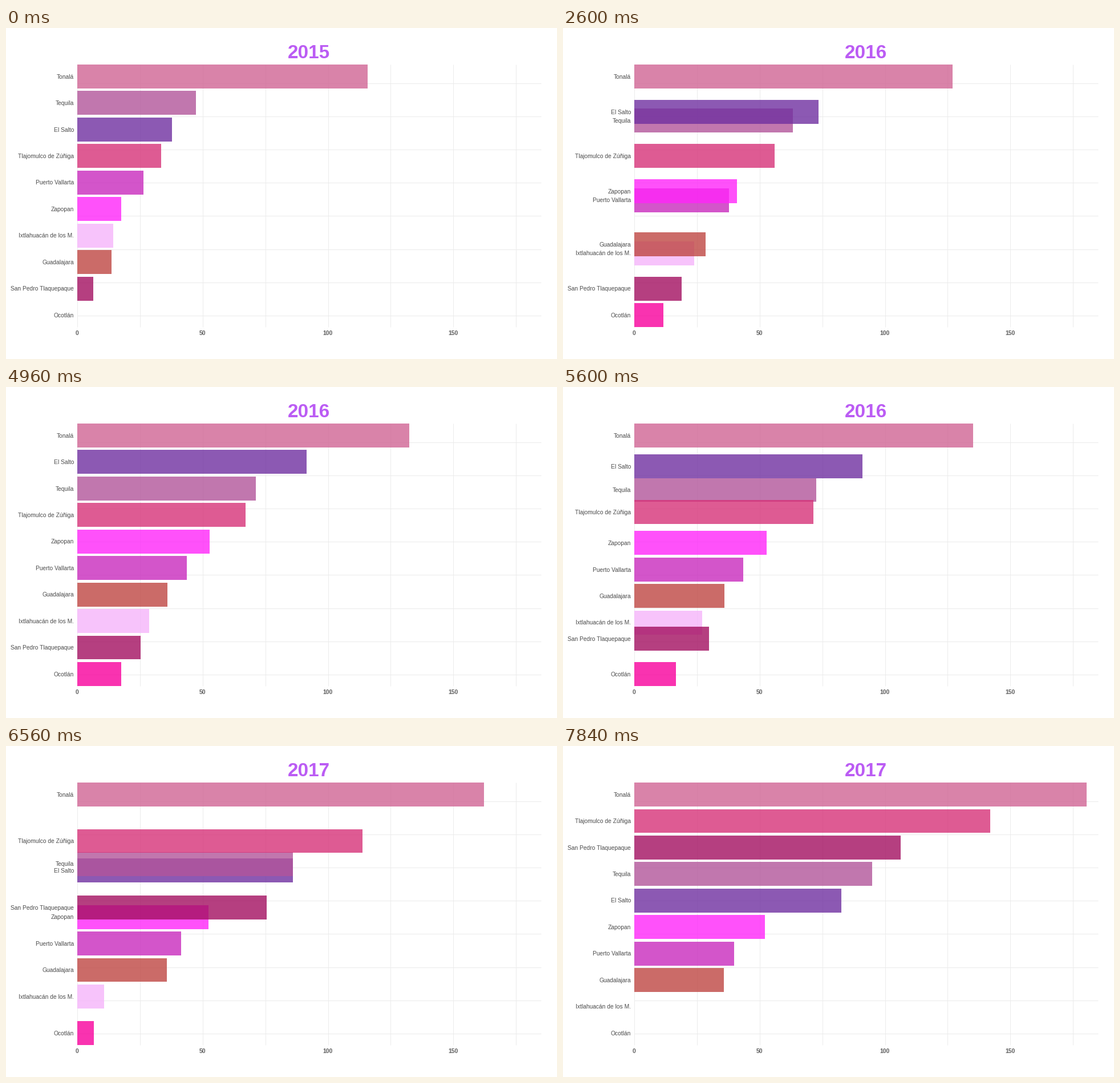
Animation of 966 by 580 pixels, one loop 8 s. Source, as a matplotlib script:

```python
import matplotlib.pyplot as plt
from matplotlib.animation import FuncAnimation
from matplotlib.patches import Rectangle

WIDTH, HEIGHT, DPI = 966, 580, 100
PX = 72 / DPI
FRAMES, INTERVAL = 200, 40

LEFT, RIGHT, TOP, BOTTOM = 124.7, 938, 64, 524
UNIT = 4.398
PITCH = (BOTTOM - TOP) / 9.9
BAR = 0.9 * PITCH

YEARS = (2015, 2016, 2017)
# (first frame, length) of the move from one year to the next
MOVES = ((20, 80), (121, 79))

# name, colour, value in each year
TOWNS = [
    ("Tonalá", "#D06494", (115.8, 132.4, 180.3)),
    ("Tequila", "#B2559A", (47.45, 71.25, 94.9)),
    ("El Salto", "#7030A0", (37.8, 91.5, 82.6)),
    ("Tlajomulco de Zúñiga", "#D63278", (33.6, 67.2, 142.1)),
    ("Puerto Vallarta", "#C82ABD", (26.35, 43.7, 39.95)),
    ("Zapopan", "#FF25F9", (17.6, 52.8, 52.2)),
    ("Ixtlahuacán de los M.", "#F5B5FB", (14.5, 28.65, 0)),
    ("Guadalajara", "#BE4642", (13.6, 36.0, 35.8)),
    ("San Pedro Tlaquepaque", "#A30F60", (6.37, 25.35, 106.3)),
    ("Ocotlán", "#F8009C", (0, 17.6, 0)),
]


def ranks(year):
    order = sorted(range(len(TOWNS)), key=lambda i: -TOWNS[i][2][year])
    return [order.index(i) for i in range(len(TOWNS))]


RANKS = [ranks(year) for year in range(len(YEARS))]


def ease(p):
    return 4 * p**3 if p < 0.5 else 1 - 4 * (1 - p) ** 3


def mix(a, b, t):
    return a + (b - a) * t


fig = plt.figure(figsize=(WIDTH / DPI, HEIGHT / DPI), dpi=DPI, facecolor="white")
ax = fig.add_axes([0, 0, 1, 1])
ax.set_xlim(0, WIDTH)
ax.set_ylim(HEIGHT, 0)
ax.axis("off")


def write(x, y, text, size, color, align="center", weight="normal"):
    return ax.text(x, y, text, size=size * PX, color=color, ha=align,
                   va="baseline", weight=weight, family="Liberation Sans")


grid = dict(color="#EBEBEB", linewidth=PX, zorder=0)
ax.vlines([LEFT + 25 * k * UNIT for k in range(8)], TOP, BOTTOM, **grid)
ax.hlines([97 + 58.1 * k for k in range(8)], LEFT, RIGHT, **grid)
for value in (0, 50, 100, 150):
    write(LEFT + value * UNIT, 538, str(value), 10.4, "#606060", weight="bold")

title = write(531.3, 53, "", 33.3, "#BB5CF4", weight="bold")
bars, labels = [], []
for name, color, _ in TOWNS:
    bar = Rectangle((LEFT, TOP), 0, BAR, facecolor=color, alpha=0.8,
                    linewidth=0, snap=True)
    bars.append(ax.add_patch(bar))
    labels.append(write(119, 0, name, 10.25, "#4D4D4D", "right"))


def draw(frame):
    year = 0 if frame < FRAMES // 2 else 1
    start, length = MOVES[year]
    progress = min(max((frame - start) / length, 0), 1)
    t = ease(progress)
    title.set_text(YEARS[year + (progress >= 0.5)])
    for i, (_, _, values) in enumerate(TOWNS):
        old, new = RANKS[year][i], RANKS[year + 1][i]
        y = TOP + PITCH * mix(old, new, t)
        bars[i].set_y(y)
        bars[i].set_width(UNIT * mix(values[year], values[year + 1], t))
        bars[i].set_zorder(1 + 0.1 * old)
        labels[i].set_y(y + BAR / 2 + 3.7)
    return [title, *bars, *labels]


anim = FuncAnimation(fig, draw, frames=FRAMES, interval=INTERVAL,
                     repeat=True, repeat_delay=0, blit=False)
plt.show()
```
